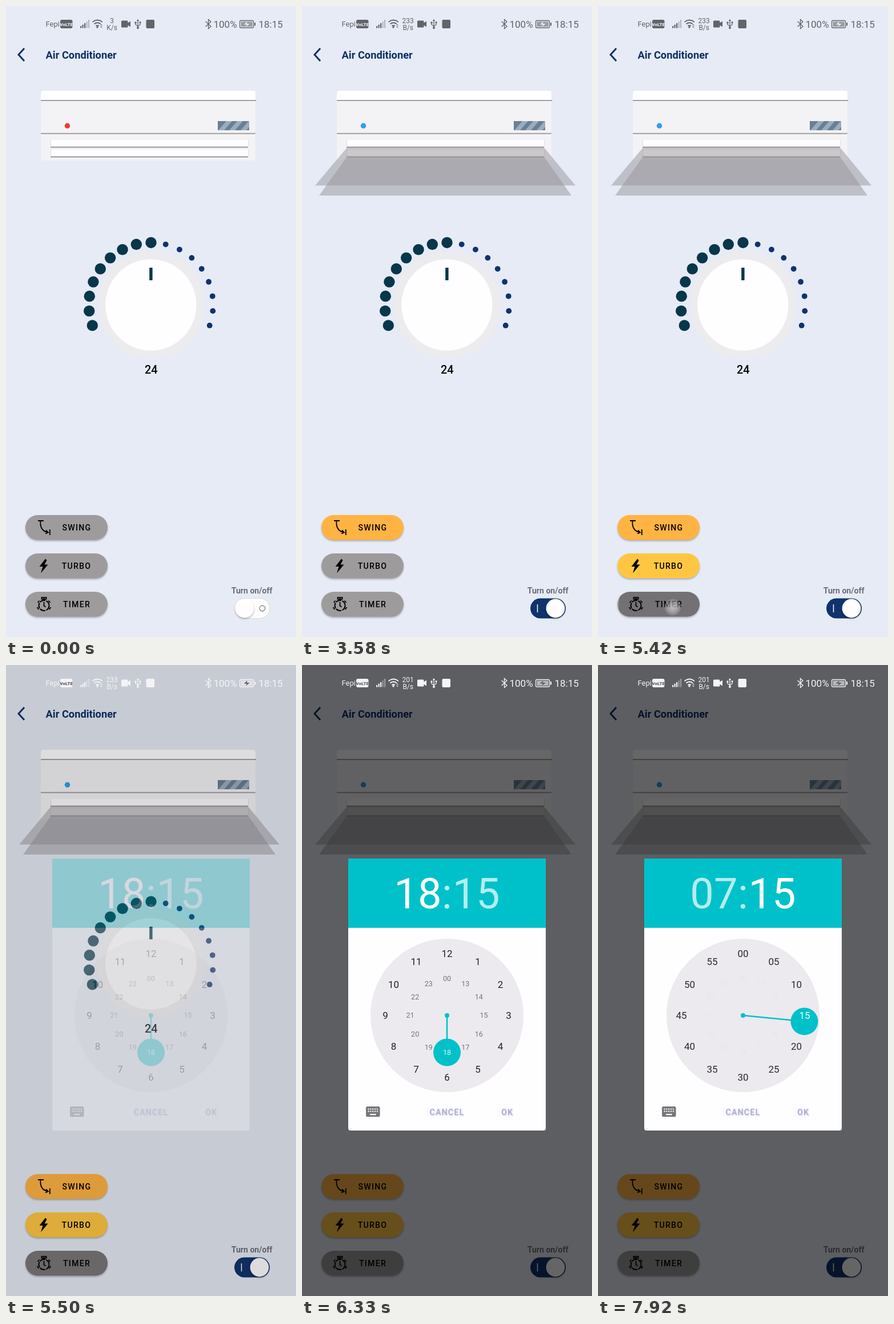
An HTML page that plays this animation: 508x1102 px, repeating every 8 s.

```html
<!DOCTYPE html>
<html lang="en">
<head>
<meta charset="utf-8">
<title>Air Conditioner</title>
<style>
html, body { margin: 0; width: 100%; height: 100%; overflow: hidden; background: #e6ebf5; }
svg { display: block; width: 100%; height: 100%; font-family: Roboto, sans-serif; }
.mid { text-anchor: middle; }
.caps { font: 500 14.1px Roboto, sans-serif; letter-spacing: 1.26px; }
.line { fill: none; stroke: currentColor; }
.soft { filter: drop-shadow(0 2px 1.5px #0004); }
.inner { fill: var(--inner, #77757a); font-size: 12.6px; }
#status { fill: currentColor; }
</style>
</head>
<body>
<svg viewBox="0 0 508 1102">
  <defs>
    <clipPath id="badge"><path d="M371 201h55v16h-55z"/></clipPath>
    <clipPath id="knobClip"><circle id="knobHole" r="24"/></clipPath>
    <radialGradient id="tapFill">
      <stop offset="0" stop-color="#ddd" stop-opacity=".75"/>
      <stop offset=".65" stop-color="#ccc" stop-opacity=".5"/>
      <stop offset="1" stop-color="#bbb" stop-opacity=".2"/>
    </radialGradient>
  </defs>
  <path fill="#e6ebf5" d="M0 0h508v1102H0z"/>

  <g fill="#0e2f66">
    <path d="M32 74 22 85l10 11" fill="none" stroke="#0e2f66" stroke-width="3"/>
    <text x="69.5" y="92" font-size="18.3" font-weight="700">Air Conditioner</text>
  </g>

  <!-- unit -->
  <path fill="#f3f2f5" d="M61 165h376v100q0 5-5 5H66q-5 0-5-5z"/>
  <path fill="#fff" d="M61 164v-11q0-5 5-5h366q5 0 5 5v11z"/>
  <path stroke="#a2a1a5" stroke-width="2" d="M61 165h377M61 222.7h376"/>
  <path fill="#fdfcfe" d="M79 234h345v12H79zM79 251h345v12H79z"/>
  <path stroke="#99979c" stroke-width="2" d="M78 246.5h346M78 263.5h346"/>
  <path stroke="#dddce0" d="M78.500 234v12m346-12v12m-346 5v12m346-12v12"/>
  <circle id="led" cx="107.500" cy="209.300" r="4.700"/>
  <path fill="#678096" d="M371 201h55v16h-55z"/>
  <path clip-path="url(#badge)" fill="#9dacbc" d="M372 217l14-16h10l-14 16zM391 217l14-16h10l-14 16zM411 217l14-16h10l-14 16z"/>
  <g id="air" fill="#989599" fill-opacity=".5">
    <path d="M79 247h345l55 66.500H23z"/>
    <path d="M79 263h345l48 68H30z"/>
  </g>

  <!-- dial -->
  <circle cx="254" cy="522" r="94" fill="#ecebee"/>
  <circle cx="253.800" cy="522" r="79.700" fill="#fefdff"/>
  <path fill="#08364a" d="M251.200 457h5.400v22h-5.400z"/>
  <g id="dots"></g>
  <text class="mid" x="254.300" y="642" font-size="19.800" font-weight="500">24</text>

  <g id="buttons"></g>
  <g fill="none" stroke="#000" stroke-width="1.800">
    <path d="M56 899h10M60.500 899c-1 11 3 18 12 20M70 915.500l4 4-5 2M76.800 914v10"/>
    <circle cx="66.500" cy="1047" r="9" stroke-width="2" stroke-dasharray="10 1.500"/>
    <path d="M66.500 1041v6.500l3 2M66.500 1034v4M62.500 1032.800h8v3h-8zM55.500 1042l3-3.500M77.500 1042l-3-3.500M54.500 1050l3 4M78.500 1050l-3 4"/>
  </g>
  <path d="M69 965.500 58.500 979h6L61 990.500 73.500 975.500h-6l4-7.500z"/>

  <!-- switch -->
  <text x="394.700" y="1026" font-size="14.100" font-weight="700" fill="#6b6e79">Turn on/off</text>
  <rect id="track" x="400" y="1034.500" width="62" height="35" rx="17.500" stroke="#d9dbe2"/>
  <circle id="offMark" cx="449" cy="1052" r="4.800" fill="none" stroke="#85868c" stroke-width="1.400"/>
  <path id="onMark" stroke="#fff" stroke-width="1.500" d="M412.500 1045v14"/>
  <circle id="thumb" class="soft" cy="1052" r="16.400" fill="#fffdfe"/>

  <path id="dim" d="M0 0h508v1102H0z"/>

  <!-- status bar -->
  <g id="status">
    <text x="69.500" y="36" font-size="13">Fepi</text>
    <rect x="95" y="24" width="21.500" height="15" rx="3"/>
    <text class="mid" x="105.700" y="34.700" font-size="8" font-weight="900" fill="var(--bg)">VoLTE</text>
    <path d="M130 35h2.200v3.500H130zM133.500 32.500h2.200v6h-2.200zM137 30h2.200v8.500H137z"/>
    <path opacity=".4" d="M140.500 27h2.200v11.500h-2.200zM144 24h2.200v14.500H144z"/>
    <g class="line" stroke-width="1.800">
      <path d="M151.500 28q8.700-7 17.400 0M154.500 31.500q5.700-4.500 11.400 0M157.500 35q2.700-2 5.400 0"/>
      <path stroke-width="1.300" d="M231 24.500v14M227 29v3.500l4 3 4-3V29"/>
      <path stroke-width="1.300" d="M349.500 27l9.500 8.500-4.500 4V23.500l4.500 4-9.500 8.500"/>
      <rect stroke-width="1.300" x="409.500" y="25.500" width="24" height="12.500" rx="2"/>
    </g>
    <circle cx="160" cy="37" r="1.700"/>
    <path d="M165 34l2-2 2 2zM165 36l2 2 2-2z"/>
    <g class="mid" font-size="12">
      <text id="rate" x="185.700" y="29.500"></text><text id="unit" x="185.700" y="42"></text>
    </g>
    <path d="M203.500 25.500h8.500q1.500 0 1.500 1.500v2.500l4.500-3v10l-4.500-3v2.500q0 1.500-1.500 1.500h-8.500q-1.500 0-1.500-1.500v-9q0-1.500 1.500-1.500z"/>
    <path d="M228.800 26l2.200-3 2.200 3zM225.500 27.500h3v3h-3z"/><circle cx="235" cy="28.500" r="1.600"/><circle cx="231" cy="38" r="2"/>
    <rect x="245.500" y="24" width="14.500" height="15" rx="2"/>
    <text x="363.500" y="37.600" font-size="17">100%</text>
    <path opacity=".6" d="M411.500 27.500h20v8.500h-20z"/><path d="M435 29h2v5.500h-2z"/>
    <path fill="var(--bg)" d="M422.500 27.500l-6 5h5l-1 3.500 6.500-5h-5z"/>
    <text x="442.500" y="37.600" font-size="17">18:15</text>
  </g>

  <!-- time picker -->
  <g id="dialog">
    <path fill="#fefdff" d="M81 338h346v471q0 4-4 4H85q-4 0-4-4z"/>
    <path fill="#00c1c9" d="M81 338h346v121H81z"/>
    <g font-size="74" fill="#fff">
      <text id="hour" x="244.500" y="424.500" text-anchor="end"></text>
      <text class="mid" x="254" y="424.500" fill-opacity=".7">:</text>
      <text id="minute" x="263.500" y="424.500">15</text>
    </g>
    <circle cx="254" cy="612" r="134" fill="#eceaee"/>
    <g fill="#222126"><g id="hours" class="mid" font-size="17"></g><g id="minutes" class="mid" font-size="17"></g></g>
    <g fill="#00c1c9">
      <circle cx="254" cy="612" r="4"/>
      <line id="hand" x1="254" y1="612" stroke="#00c1c9" stroke-width="2.600"/>
      <circle id="knob" r="24"/>
    </g>
    <g clip-path="url(#knobClip)" fill="#fff" style="--inner:#d9f6f7"><use href="#hours"/><use href="#minutes"/></g>
    <rect x="112" y="771" width="24.500" height="18" rx="2.500" fill="#77757a"/>
    <path stroke="#fff" stroke-width="2.200" stroke-dasharray="2.200 1.600" d="M115.500 775.500h18M115.500 779.500h18"/>
    <path stroke="#fff" stroke-width="2.200" d="M119 785h10.500"/>
    <g class="caps" fill="#a9aadb" style="filter:drop-shadow(1px 1px 1px #0003)">
      <text x="223.500" y="785.500">CANCEL</text><text x="349" y="785.500">OK</text>
    </g>
  </g>
  <circle id="tap" r="14" fill="url(#tapFill)" stroke="#9996"/>
</svg>
<script>
const $ = id => document.getElementById(id);
const set = (id, attrs) => { for (const k in attrs) $(id).setAttribute(k, attrs[k]); };
const ramp = (t, from, to) => Math.min(1, Math.max(0, (t - from) / (to - from)));
const ease = p => (1 - Math.cos(Math.PI * p)) / 2;
const mix = (a, b, p) => a + (b - a) * p;
const polar = (cx, cy, r, deg) => {
  const a = deg * Math.PI / 180;
  return [cx + r * Math.sin(a), cy - r * Math.cos(a)];
};

const LOOP = 8000;
const buttons = [
  { label: 'SWING', x: 98.5, y: 889, on: '#ffb343', tap: 0 },
  { label: 'TURBO', x: 97.7, y: 956, on: '#ffc642', tap: 1 },
  { label: 'TIMER', x: 100, y: 1023, on: '#9e9b9d', tap: 2 }
];
// x, y, down, up
const taps = [[122, 912, 3170, 3330], [122, 980, 3750, 3920], [131, 1050, 5250, 5470],
              [432, 1053, 250, 420], [200, 706, 7170, 7490]];

$('dots').innerHTML = Array.from({ length: 17 }, (_, i) => {
  const [x, y] = polar(254, 522, 108.8, (i - 8) * 13.66);
  return `<circle cx="${x}" cy="${y}" r="${i < 9 ? 9.7 : 4.9}" fill="${i < 9 ? '#08364a' : '#10336b'}"/>`;
}).join('');

$('buttons').innerHTML = buttons.map((b, i) => {
  const box = `<rect id="face${i}" x="34" y="${b.y}" width="144" height="43.5" rx="21.7"`;
  return `<clipPath id="clip${i}">${box.replace('face', 'edge')}/></clipPath>
    ${box} class="soft"/>
    <text class="caps" x="${b.x}" y="${b.y + 27}">${b.label}</text>
    <g clip-path="url(#clip${i})"><circle id="ripple${i}" cx="${taps[i][0]}" cy="${taps[i][1]}"/></g>`;
}).join('');

const ring = (r, drop, name, cls = '') => Array.from({ length: 12 }, (_, i) => {
  const [x, y] = polar(254, 612, r, i * 30);
  return `<text class="${cls}" x="${x}" y="${y + drop}">${name(i)}</text>`;
}).join('');
const two = n => String(n).padStart(2, '0');
$('hours').innerHTML = ring(108, 6, i => i || 12) + ring(64.5, 4.4, i => two(i && i + 12), 'inner');
$('minutes').innerHTML = ring(108, 6, i => two(i * 5));

function draw(t) {
  const on = ease(ramp(t, 420, 680));
  set('track', { fill: `rgb(${mix(254, 16, on)},${mix(253, 51, on)},${mix(254, 107, on)})`, 'stroke-opacity': 1 - on });
  set('thumb', { cx: mix(418, 444, on) });
  set('offMark', { opacity: 1 - on });
  set('onMark', { opacity: on });
  set('led', { fill: t < 670 ? '#f4392b' : '#2d9fe9' });
  set('air', { opacity: ease(ramp(t, 680, 1600)) });

  buttons.forEach((b, i) => {
    const [, , down, up] = taps[b.tap];
    set('face' + i, { fill: t < up ? '#9e9b9d' : b.on });
    set('ripple' + i, {
      r: t < down ? 0 : 30 + (t - down) * .38,
      opacity: .27 * ramp(t, down, down + 80) * (1 - ramp(t, up, up + 220))
    });
  });

  const touch = taps.find(p => t >= p[2] && t < p[3]);
  set('tap', touch ? { cx: touch[0], cy: touch[1], opacity: 1 } : { opacity: 0 });

  const open = t >= 5500;
  set('dim', { opacity: .6 * ramp(t, 5470, 5590 + 20) });
  set('dialog', { opacity: ramp(t, 5470, 5585) });
  $('status').style.color = open ? '#f4f4f6' : '#626469';
  $('status').style.setProperty('--bg', open ? '#5c5e64' : '#e6ebf5');
  $('rate').textContent = t < 2960 ? '3' : t < 6000 ? '233' : '201';
  $('unit').textContent = t < 2960 ? 'K/s' : 'B/s';

  const picked = t >= 7170, swap = ease(ramp(t, 7490, 7990));
  const [x, y] = polar(254, 612, picked ? 108 : 64.5, picked ? mix(210, 90, swap) : 180);
  $('hour').textContent = picked ? '07' : '18';
  set('hour', { 'fill-opacity': t < 7490 ? 1 : .7 });
  set('minute', { 'fill-opacity': t < 7490 ? .7 : 1 });
  set('hours', { opacity: 1 - swap });
  set('minutes', { opacity: swap });
  set('hand', { x2: x, y2: y });
  set('knob', { cx: x, cy: y });
  set('knobHole', { cx: x, cy: y });
}

const start = performance.now();
function tick() {
  draw((performance.now() - start) % LOOP);
  requestAnimationFrame(tick);
}
tick();
</script>
</body>
</html>
```
